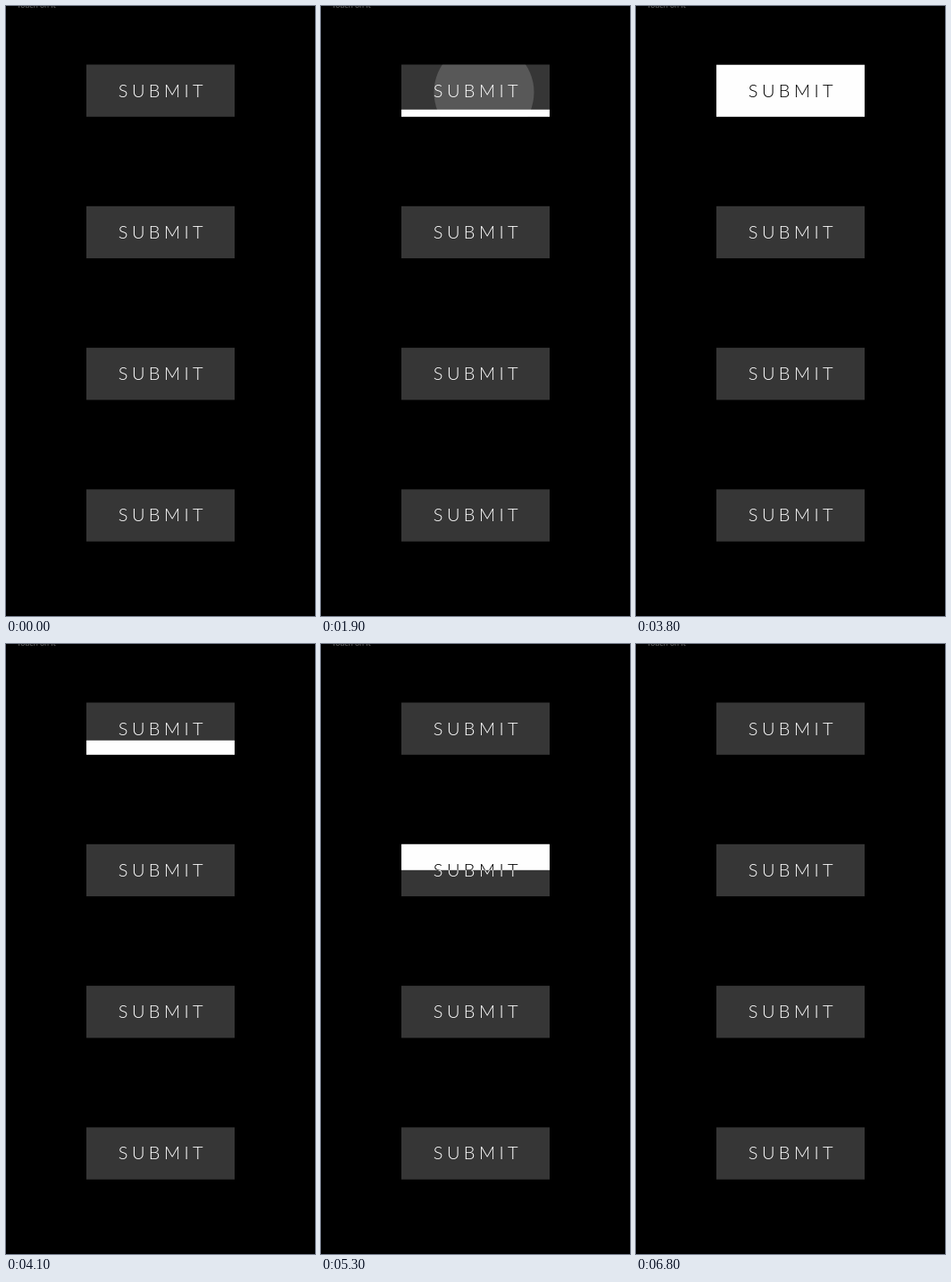
Recreate the animation shown at these times as an HTML page with a canvas. Size 346 by 682 pixels, loop 8000 ms.

```html
<!DOCTYPE html>
<html lang="en">
<head>
<meta charset="utf-8">
<title>Submit buttons</title>
<style>
html, body { margin: 0; width: 346px; height: 682px; overflow: hidden; background: #000; }
canvas { display: block; }
</style>
</head>
<body>
<canvas id="stage" width="346" height="682"></canvas>
<script>
const ctx = document.getElementById('stage').getContext('2d');
const LOOP = 8000, STEP = 100, FILL_MS = 500;
const X = 90, W = 166, H = 58.3, TOP = 65.5, PITCH = 158.3;

// Each button fills with white from one side, then empties the same way.
const buttons = [
  { enter: 1772, leave: 3782, tap: 1900, side: 'bottom' },
  { enter: 5050, leave: 6235, tap: 5000, side: 'top' },
  {},
  {}
];

const clamp = v => Math.min(1, Math.max(0, v));

// cubic-bezier(.42, 0, .58, 1)
function easeInOut(x) {
  if (x <= 0 || x >= 1) return clamp(x);
  let lo = 0, hi = 1;
  for (let i = 0; i < 24; i++) {
    const s = (lo + hi) / 2, r = 1 - s;
    if (3 * r * r * s * 0.42 + 3 * r * s * s * 0.58 + s * s * s < x) lo = s;
    else hi = s;
  }
  return lo * lo * (3 - 2 * lo);
}

function clipTo(y, h, draw) {
  ctx.save();
  ctx.beginPath();
  ctx.rect(X, y, W, h);
  ctx.clip();
  draw();
  ctx.restore();
}

function label(top, color) {
  ctx.font = '300 20px Lato, "Open Sans", sans-serif';
  ctx.letterSpacing = '4.4px';
  ctx.fillStyle = color;
  ctx.fillText('SUBMIT', 125.8, top + 36);
}

function ripple(top, age) {
  if (age < 0 || age >= 300) return;
  const k = age / 300;
  clipTo(top, H, () => {
    ctx.fillStyle = `rgba(255,255,255,${0.17 * (1 - k)})`;
    ctx.beginPath();
    ctx.arc(182.5, top + 31, 56 + 70 * k, 0, Math.PI * 2);
    ctx.fill();
  });
}

function drawButton(b, top, t) {
  ctx.fillStyle = '#363636';
  ctx.fillRect(X, top, W, H);
  if (b.side) ripple(top, t - b.tap);
  label(top, '#fff');
  if (!b.side) return;

  const amount = easeInOut((t - b.enter) / FILL_MS) - easeInOut((t - b.leave) / FILL_MS);
  const h = amount > 0.999 ? H : Math.round(amount * H);
  if (h <= 0) return;
  const y = b.side === 'top' ? top : top + H - h;
  ctx.fillStyle = '#fefefe';
  ctx.fillRect(X, y, W, h);
  clipTo(y, h, () => label(top, '#000'));
}

function draw(t) {
  ctx.fillStyle = '#000';
  ctx.fillRect(0, 0, 346, 682);
  ctx.font = '9px Lato, sans-serif';
  ctx.letterSpacing = '0px';
  ctx.fillStyle = '#666';
  ctx.fillText('Touch on it', 12, 1.5);
  buttons.forEach((b, i) => drawButton(b, TOP + i * PITCH, t));
}

const start = performance.now();
function tick() {
  const t = (performance.now() - start) % LOOP;
  draw(Math.floor(t / STEP) * STEP);
  requestAnimationFrame(tick);
}
tick();
</script>
</body>
</html>
```
